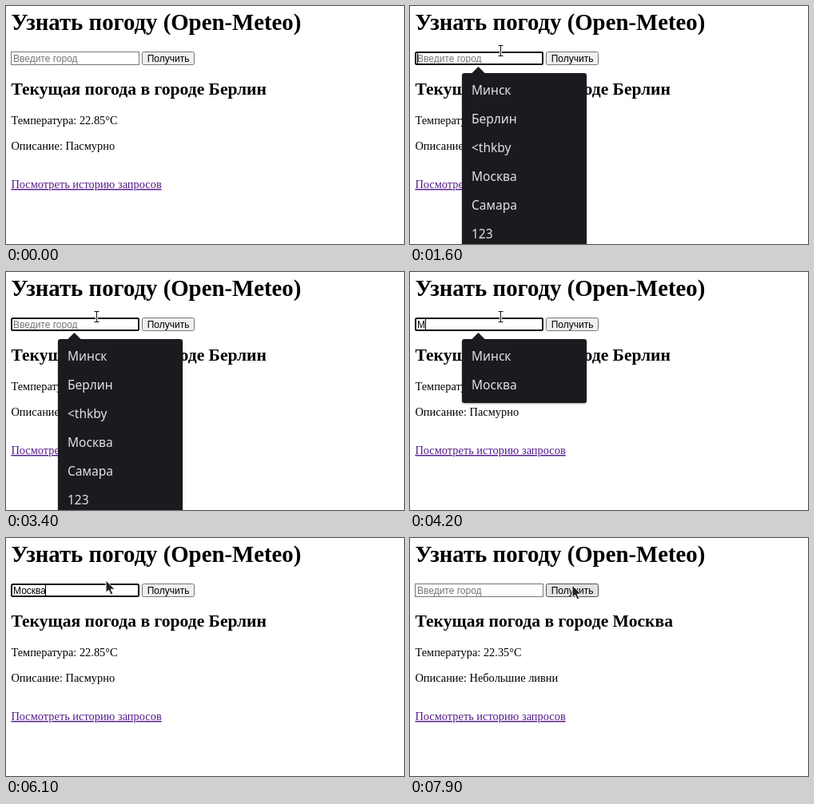
Animation of 498x298 px, one loop 8 s. Source, as an HTML page:

```html
<!DOCTYPE html>
<html lang="ru">
<head>
<meta charset="utf-8">
<style>
  html, body { margin: 0; width: 100%; height: 100%; overflow: hidden; background: #fff; }
  svg { display: block; width: 498px; height: 298px; }
  text { font: 14.4px "Liberation Serif", serif; white-space: pre; }
  .h1 { font-size: 28.8px; font-weight: bold; }
  .h2 { font-size: 21.6px; font-weight: bold; }
  .ui { font: 12px "Liberation Sans", sans-serif; }
  .link { fill: #551a8b; text-decoration: underline; }
  #popup { fill: #1a1b1f; filter: drop-shadow(0 1px 1px #0005); }
  #popup text { font: 15.5px "Noto Sans", sans-serif; fill: #e2e2e4; }
</style>
</head>
<body>
<svg viewBox="0 0 498 298">
  <text class="h1" x="6.4" y="30">Узнать погоду (Open-Meteo)</text>
  <rect id="box" fill="#fff"/>
  <text id="field" class="ui" x="9" y="70"></text>
  <path id="caret" stroke="#000"/>
  <rect id="button" x="170.5" y="57.5" width="65" height="16" rx="2"/>
  <text class="ui" x="176.7" y="70">Получить</text>
  <text id="title" class="h2" x="6.4" y="111"></text>
  <text id="temp" x="6.4" y="148"></text>
  <text id="sky" x="6.4" y="180"></text>
  <text class="link" x="6.4" y="228">Посмотреть историю запросов</text>
  <g id="popup">
    <path d="M77 84.5 85.5 76 94 84.5Z"/>
    <rect id="panel" x="65" y="84" width="156" rx="3"/>
    <g id="items"></g>
  </g>
  <path id="arrow" d="M0 0V15.5L3.6 12.3 6.1 18 8.8 16.8 6.3 11.3H11.2Z" fill="#222" stroke="#fff"/>
  <g id="beam" fill="none">
    <path d="M-3-6.5H3M0-6.5V6.5M-3 6.5H3" stroke="#fff" stroke-width="3"/>
    <path d="M-3-6.5H3M0-6.5V6.5M-3 6.5H3" stroke="#111"/>
  </g>
</svg>
<script>
const $ = id => document.getElementById(id);
const LOOP = 8000, STEP = 100;
const FOCUS = 1600, PRESS = 6800, LOADED = 7300;
const CITY = 'Москва';
const keyTimes = [3800, 4600, 4900, 5200, 5400, 5700];
const history = ['Минск', 'Берлин', '<thkby', 'Москва', 'Самара', '123', ''];
// time, x, y
const mousePath = [
  [100, 510, 150], [800, 114.5, 92], [900, 114.5, 92], [1300, 113.5, 56],
  [6000, 113.5, 56], [6100, 125, 53], [6250, 152, 48], [6600, 203, 59], [LOOP, 203, 59]
];

function mouseAt(t) {
  const i = mousePath.findIndex(p => p[0] > t);
  if (i < 1) return [-50, -50];
  const [t0, x0, y0] = mousePath[i - 1], [t1, x1, y1] = mousePath[i];
  const u = (t - t0) / (t1 - t0), e = u * u * (3 - 2 * u);
  return [x0 + (x1 - x0) * e, y0 + (y1 - y0) * e];
}

function set(id, attrs) {
  for (const name in attrs) $(id).setAttribute(name, attrs[name]);
}

function show(id, visible) {
  $(id).style.display = visible ? '' : 'none';
}

function drawForm(t, x) {
  const focused = t >= FOCUS && t < PRESS;
  const keys = keyTimes.filter(k => k <= t);
  const typed = t < LOADED ? CITY.slice(0, keys.length) : '';
  set('box', focused
    ? { x: 7, y: 58, width: 159, height: 15, rx: 1.5, stroke: '#101010', 'stroke-width': 2 }
    : { x: 6.5, y: 57.5, width: 160, height: 16, rx: 0, stroke: '#767676', 'stroke-width': 1 });
  $('field').textContent = typed || 'Введите город';
  set('field', { fill: typed ? '#000' : '#757575' });

  const caretX = Math.floor(9 + (typed ? $('field').getComputedTextLength() : 0)) + 0.5;
  set('caret', { d: `M${caretX} 59V72` });
  show('caret', focused && (t - (keys.at(-1) ?? FOCUS)) % 1000 < 500);

  const hover = x > 170 && x < 236;
  const pressed = t >= PRESS && t < PRESS + 100;
  set('button', {
    fill: pressed ? '#f5f5f5' : hover ? '#e3e3e6' : '#efefef',
    stroke: hover ? '#4f4f4f' : '#767676'
  });

  const matches = history.filter(h => h.startsWith(typed));
  show('popup', focused && typed !== CITY);
  set('panel', { height: 36 * matches.length + 8 });
  $('items').innerHTML = matches.map((m, i) =>
    `<text x="77" y="${111 + 36 * i}">${m.replace('<', '&lt;')}</text>`).join('');
}

function drawWeather(loaded) {
  $('title').textContent = 'Текущая погода в городе ' + (loaded ? CITY : 'Берлин');
  $('temp').textContent = `Температура: ${loaded ? '22.35' : '22.85'}°C`;
  $('sky').textContent = 'Описание: ' + (loaded ? 'Небольшие ливни' : 'Пасмурно');
}

function draw(t) {
  const [x, y] = mouseAt(t);
  const overText = (x < 167 && y > 55 && y < 74) || (x < 326 && y > 91 && y < 116);
  drawForm(t, x);
  drawWeather(t >= LOADED);
  for (const id of ['arrow', 'beam']) set(id, { transform: `translate(${x} ${y})` });
  show('arrow', !overText);
  show('beam', overText);
}

function frame() {
  draw(Math.floor(performance.now() % LOOP / STEP) * STEP);
  requestAnimationFrame(frame);
}
frame();
</script>
</body>
</html>
```
